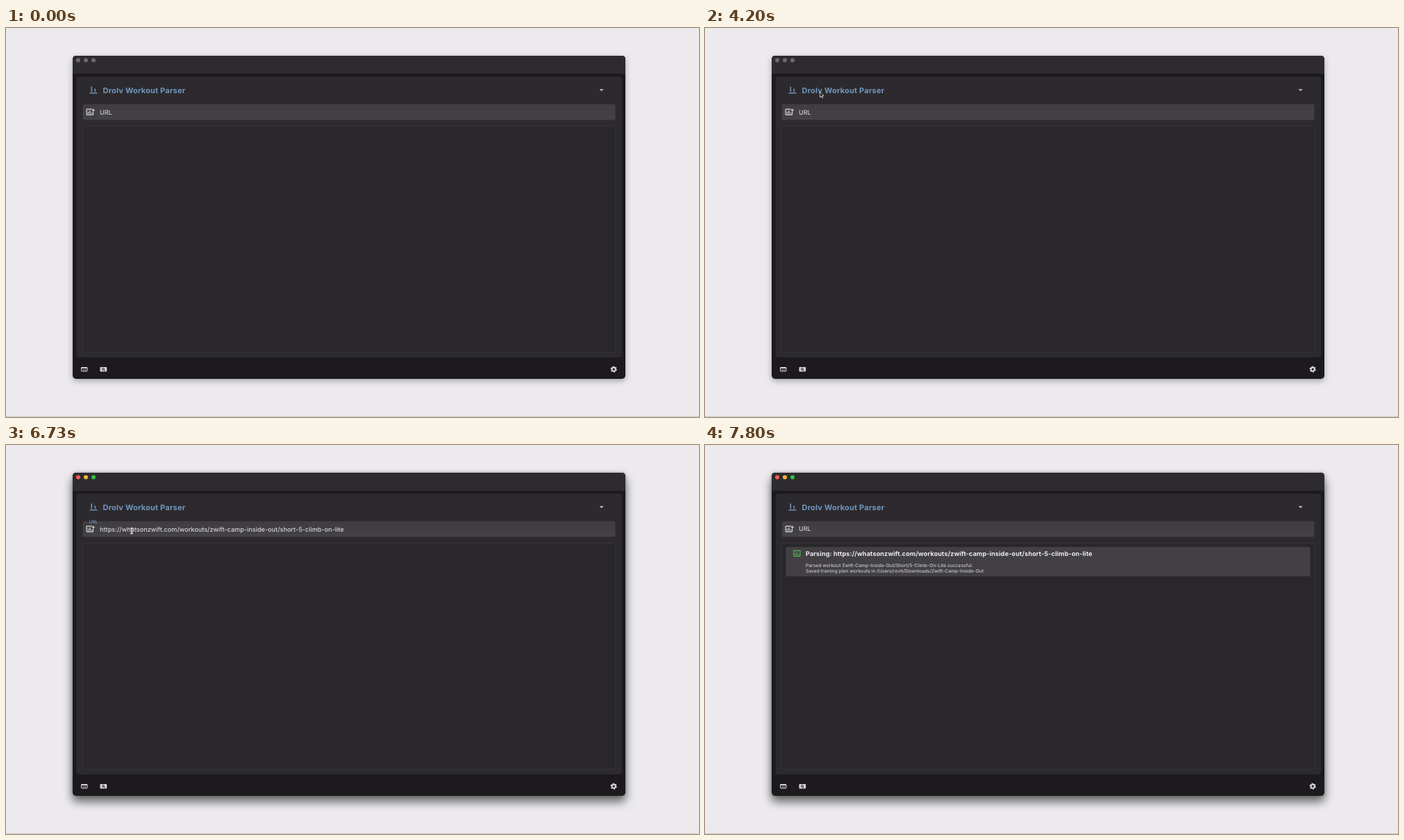
Recreate the animation shown at these times as an HTML page. Size 998 px wide and 561 px high, loop 8 s.

```html
<!DOCTYPE html>
<html lang="en">
<head>
<meta charset="utf-8">
<title>Workout parser</title>
<style>
  html, body { margin: 0; width: 100%; height: 100%; overflow: hidden; background: #eceaed; }
  svg { display: block; width: 100%; height: 100%; }
  text { font-family: Inter, Roboto, sans-serif; font-weight: 500; font-size: 9.1px; fill: #d5d3d6; text-rendering: geometricPrecision; }
  .title { font-size: 11px; font-weight: 700; letter-spacing: .2px; fill: #7096bd; }
  .head { font-size: 9.15px; font-weight: 700; letter-spacing: .1px; fill: #eeecef; }
  .log { font-size: 6.72px; fill: #cbc9cc; }
  #idle { filter: drop-shadow(0 3px 4px rgba(0,0,0,.3)); }
  #active { filter: drop-shadow(0 8px 7px rgba(0,0,0,.5)) drop-shadow(0 0 2px rgba(0,0,0,.3)); }
</style>
</head>
<body>
<svg viewBox="0 0 998 561">
  <defs>
    <linearGradient id="field" x2="0" y2="1">
      <stop stop-color="#3f3d40"/><stop offset="1" stop-color="#444245"/>
    </linearGradient>
    <g id="chart" fill="none" stroke="currentColor" stroke-width="1.1">
      <rect x=".6" y=".6" width="9.4" height="8" rx=".6"/>
      <path d="M3 7V4.2M5.3 7V2.6M7.6 7V5.2" stroke-width="1.2"/>
    </g>
  </defs>

  <rect width="998" height="561" fill="#eceaed"/>
  <rect y="560" width="998" height="1" fill="#cac8cb"/>

  <rect id="idle" x="96" y="40" width="796" height="466" rx="5" fill="#1c1a1d"/>
  <rect id="active" x="96" y="40" width="796" height="466" rx="5" fill="#1c1a1d"/>
  <path d="M96 66V45q0-5 5-5H887q5 0 5 5V66Z" fill="#2d2b2e"/>
  <g id="lights">
    <circle cx="104" cy="46.4" r="3"/><circle cx="115" cy="46.4" r="3"/><circle cx="126" cy="46.4" r="3"/>
  </g>
  <rect x="101.500" y="70" width="785.500" height="405" rx="4" fill="#2c2a2d"/>

  <path d="M120.500 93.700H131.500M123.300 84.500V92M128.300 87.500V92" fill="none" stroke="#7096bd" stroke-width="1.600"/>
  <text class="title" x="139.500" y="93.500">Drolv Workout Parser</text>
  <path d="M854.500 88H860.700L857.600 91.200Z" fill="#b5b3b6"/>

  <rect x="110.500" y="110" width="767" height="22.500" rx="2" fill="url(#field)"/>
  <g transform="translate(115.500 116.500)" color="#e6e4e7">
    <use href="#chart"/>
    <path d="M8 0H12.500V4H8Z" fill="#424043"/>
    <path d="M10.300 0V4.200M8.200 2.100H12.400" stroke="currentColor"/>
  </g>
  <rect x="110.500" y="141.700" width="767.300" height="326" rx="3" fill="#29272a" stroke="#3a383b" stroke-width=".8"/>

  <text id="label">URL</text>
  <text id="url" x="135" y="124.500"></text>
  <rect id="caret" y="116" width="1" height="11" fill="#7096bd"/>

  <g id="card">
    <rect id="cardBox" x="116.500" y="147" width="755" rx="2.500" fill="#424043"/>
    <use id="cardIcon" href="#chart" x="127" y="151.800"/>
    <text id="heading" class="head" x="145"></text>
    <g id="progress">
      <rect x="145" y="165.800" width="713" height="1.700" fill="#4f7599"/>
      <rect id="bar" y="165.800" height="1.700" fill="#6c9ccb"/>
    </g>
    <g id="result">
      <text class="log" x="145" y="176.400">Parsed workout Zwift-Camp-Inside-Out/Short/5-Climb-On-Lite successful.</text>
      <text class="log" x="145" y="184.400">Saved training plan workouts in /Users/rovti/Downloads/Zwift-Camp-Inside-Out</text>
    </g>
  </g>

  <g fill="none" stroke="#d8d6d9">
    <rect x="108.500" y="489.500" width="8.500" height="5.600" rx=".6"/>
    <path d="M108.500 490.200H117" stroke-width="1.600"/>
    <path d="M110.200 493.200H115.400" stroke-width="1.300" stroke-dasharray="1.300 .6"/>
  </g>
  <rect x="135.500" y="489" width="9.700" height="6.600" rx=".8" fill="#d8d6d9"/>
  <g fill="none" stroke="#2a282b">
    <circle cx="140" cy="492" r="1.500"/><path d="M141 493L142.700 494.600"/>
  </g>
  <g transform="translate(875.200 492.200)" fill="none" stroke="#d8d6d9">
    <circle r="2.600" stroke-width="2"/>
    <circle r="3.900" stroke-width="1.500" stroke-dasharray="2.040 2.044"/>
  </g>

  <path id="arrow" d="M0 0V7.600L1.800 6L3 8.700L4.300 8.100L3.200 5.500H5.600Z" fill="#111" stroke="#f2f0f3" stroke-width=".8"/>
  <g id="beam" fill="none">
    <path d="M-1.700-4Q0-4 0-2.800Q0-4 1.700-4M0-3V3M-1.700 4Q0 4 0 2.800Q0 4 1.700 4M-1.200 1H1.200" stroke="#f2f0f3" stroke-width="1.500"/>
    <path d="M0-3V3" stroke="#555" stroke-width=".5"/>
  </g>
</svg>
<script>
const LOOP = 8000;
const MOVE = 3730, ARRIVE = 4530, FOCUS = 4600, PASTE = 5670, SUBMIT = 6870, DONE = 7470;
const ADDRESS = 'https://whatsonzwift.com/workouts/zwift-camp-inside-out/short-5-climb-on-lite';
const LIGHTS = ['#fb5a52', '#f3b53a', '#2fc141'];

const el = id => document.getElementById(id);
const set = (id, attrs) => { for (const key in attrs) el(id).setAttribute(key, attrs[key]); };
const show = (id, on) => { el(id).style.display = on ? '' : 'none'; };
const clamp = v => Math.min(1, Math.max(0, v));
const mix = (a, b, k) => a + (b - a) * k;
const mixColor = (a, b, k) => `rgb(${a.map((v, i) => Math.round(mix(v, b[i], k)))})`;
const between = (t, a, b) => t >= a && t < b;
// Material standard curve: quick start, long settle
const ease = (t, start, length) => {
  const s = clamp((t - start) / length) ** .68;
  return s * s * (3 - 2 * s);
};
const curve = (a, b, c, k) => (1 - k) ** 2 * a + 2 * k * (1 - k) * b + k * k * c;

function drawWindow(t) {
  const focused = t >= FOCUS;
  show('idle', !focused);
  show('active', focused);
  [...el('lights').children].forEach((dot, i) => dot.setAttribute('fill', focused ? LIGHTS[i] : '#6c6a6d'));
}

function drawField(t) {
  const raised = ease(t, FOCUS + 20, 360) - ease(t, DONE, 340);
  const blue = ease(t, FOCUS + 100, 300) - ease(t, SUBMIT, 200);
  set('label', {
    transform: `translate(${mix(135, 119.7, raised)} ${mix(124.5, 113, raised)}) scale(${mix(1, .71, raised)})`
  });
  el('label').style.fill = mixColor([205, 203, 206], [112, 150, 189], blue);

  const filled = between(t, PASTE, DONE);
  el('url').textContent = filled ? ADDRESS : '';
  set('caret', { x: filled ? 490 : 135 });
  show('caret', between(t, FOCUS, FOCUS + 530) || between(t, PASTE, PASTE + 600));
}

function drawCard(t) {
  const done = t >= DONE;
  show('card', t >= SUBMIT);
  show('progress', !done);
  show('result', done);
  set('cardBox', { height: done ? 42.5 : 37 });
  set('heading', { y: done ? 159.7 : 160.5 });
  set('cardIcon', { color: mixColor([112, 150, 189], [76, 190, 84], ease(t, DONE, 330)) });

  const p = clamp((t - SUBMIT) / 1240);
  const left = -.35 + 1.35 * p;
  const right = left + .38 + .75 * p;
  const x = 145 + 713 * clamp(left);
  set('bar', { x, width: 145 + 713 * clamp(right) - x });
}

function drawPointer(t) {
  const k = clamp((t - MOVE) / (ARRIVE - MOVE));
  const x = curve(129, 167, 181, k), y = curve(51, 84, 123.7, k);
  const visible = between(t, MOVE, SUBMIT), overField = y > 110;
  for (const id of ['arrow', 'beam']) set(id, { transform: `translate(${x} ${y})` });
  show('arrow', visible && !overField);
  show('beam', visible && overField);
}

function draw() {
  const t = performance.now() % LOOP;
  drawWindow(t);
  drawField(t);
  drawCard(t);
  drawPointer(t);
  requestAnimationFrame(draw);
}

el('heading').textContent = 'Parsing: ' + ADDRESS;
draw();
</script>
</body>
</html>
```
